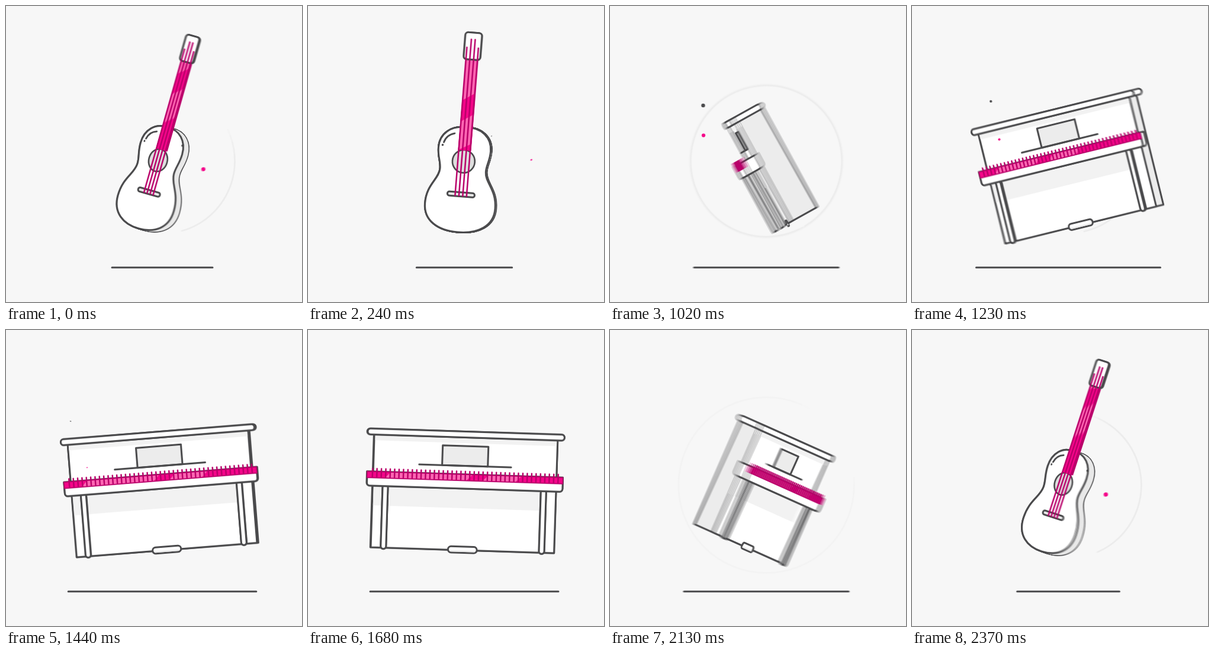
Write an HTML page with a canvas that moves like this. It is 500 by 500 pixels and loops after 2400 ms.

```html
<!DOCTYPE html>
<html lang="en">
<head>
<meta charset="utf-8">
<title>Guitar and piano</title>
<style>
  html, body { margin: 0; height: 100%; overflow: hidden; background: #f7f7f7; }
  canvas { display: block; width: 500px; height: 500px; }
</style>
</head>
<body>
<canvas id="stage" width="500" height="500"></canvas>
<script>
const LOOP = 2400, HALF = 1200, FLIP = 1010;
const INK = '#4a4a4c', PALE = '#ececec', PINK = '#f5058a', DEEP = '#b9006a', LIGHT = '#ff66b3';
const screen = document.getElementById('stage').getContext('2d');
const layer = document.createElement('canvas');
layer.width = layer.height = 500;
const ctx = layer.getContext('2d');

// Smooth curve through [x, y] points, clamped at both ends
function curve(...pts) {
  const last = pts.length - 1;
  const slope = i => {
    const [x0, y0] = pts[Math.max(i - 1, 0)], [x1, y1] = pts[Math.min(i + 1, last)];
    return (y1 - y0) / (x1 - x0);
  };
  return x => {
    if (x <= pts[0][0]) return pts[0][1];
    if (x >= pts[last][0]) return pts[last][1];
    const i = pts.findIndex(p => p[0] > x) - 1;
    const [x0, y0] = pts[i], [x1, y1] = pts[i + 1];
    const d = x1 - x0, p = (x - x0) / d, q = 1 - p;
    return y0 * q * q * (1 + 2 * p) + y1 * p * p * (3 - 2 * p)
      + d * p * q * (slope(i) * q - slope(i + 1) * p);
  };
}

// Sway and turn depend on the time to the nearest swap
const sway = curve([0, 29.6], [10, 29.2], [160, 18.1], [190, 15.9], [290, 9.7], [430, 4.6], [600, 0]);
const turnAt = curve([0, 1], [10, .97], [160, .33], [190, .28], [290, .16], [430, .045], [600, 0]);
const shine = curve([0, -200], [160, -140], [190, -122], [430, -75], [910, -52], [1200, -40]);
const ringRadius = curve([-290, 150], [-50, 148], [-20, 146.5], [10, 128], [160, 123.5], [190, 122.5], [250, 121]);
const ringStart = curve([-290, -360], [10, -212], [160, 23], [190, 73], [245, 168]);
const ringEnd = curve([-290, -358], [-20, 120], [10, 148], [160, 156], [190, 164], [245, 169]);
const ringAlpha = curve([-290, .35], [-50, .4], [-20, 1], [10, 1]);

let turn = 0, squash = 1;

function finish(fill, stroke, width) {
  if (fill) { ctx.fillStyle = fill; ctx.fill(); }
  if (stroke) { ctx.strokeStyle = stroke; ctx.lineWidth = width; ctx.stroke(); }
}

// Path on a plane at depth z; the stroke keeps its width
function paint(z, build, fill, stroke = INK, width = 3) {
  ctx.save();
  ctx.translate(-turn * z, 0);
  ctx.scale(squash, 1);
  ctx.beginPath();
  build();
  ctx.restore();
  finish(fill, stroke, width);
}

const rect = (x0, x1, y0, y1, r = 0) => () => ctx.roundRect(x0, y0, x1 - x0, y1 - y0, r);
const line = (x0, y0, x1, y1) => () => { ctx.moveTo(x0, y0); ctx.lineTo(x1, y1); };

function box(x0, x1, y0, y1, front, back, { r = 0, fill = '#fff', side = '#fff', stroke = INK } = {}) {
  const a = -turn * front, b = -turn * back;
  const left = squash * x0 + Math.min(a, b), right = squash * x1 + Math.max(a, b);
  ctx.beginPath();
  ctx.roundRect(left, y0, right - left, y1 - y0, r);
  finish(side, stroke, 3);
  paint(front, rect(x0, x1, y0, y1, r), fill, stroke);
}

function disc(x, y, r, color) {
  if (r <= 0) return;
  ctx.beginPath();
  ctx.arc(x, y, r, 0, 7);
  finish(color);
}

function guitarBody() {
  ctx.moveTo(0, -59);
  for (const s of [1, -1]) {
    ctx.moveTo(0, -59);
    ctx.bezierCurveTo(26 * s, -61, 45 * s, -45, 45 * s, -22);
    ctx.bezierCurveTo(45 * s, -5, 39 * s, 2, 39.5 * s, 14);
    ctx.bezierCurveTo(40 * s, 32, 60.5 * s, 42, 60.5 * s, 74);
    ctx.bezierCurveTo(60.5 * s, 104, 34 * s, 118.5, 0, 118.5);
  }
}

function guitar(w) {
  const depths = Array.from({ length: 13 }, (_, i) => -6 + i * 34 / 12);
  for (const z of depths) paint(z, guitarBody, null);
  for (const z of depths) paint(z, guitarBody, '#e9e9e9', null);
  paint(28, guitarBody, '#fff');
  paint(28, () => {
    ctx.moveTo(-36.5, -31);
    ctx.quadraticCurveTo(-33, -44, -19, -47.5);
  }, null, INK, 2.8);
  paint(28, () => ctx.arc(-38.2, -26.5, 1.8, 0, 7), INK, null);
  paint(28, () => ctx.arc(0, -1.4, 19.3, 0, 7), '#dedede', INK, 2.6);
  paint(28, rect(-23.5, 23.5, 51, 58, 3.5), '#ebebeb');

  box(-11, 11, -173, -20, 28, 20, { fill: PINK, side: DEEP, stroke: null });
  const b = shine(w);
  const stripe = (from, to) => paint(28, () => {
    const at = (y, tilt) => Math.max(-173, Math.min(-20, y + tilt));
    ctx.moveTo(-11, at(from, 7));
    ctx.lineTo(11, at(from, -7));
    ctx.lineTo(11, at(to, -7));
    ctx.lineTo(-11, at(to, 7));
  }, LIGHT, null);
  stripe(-250, b - 36);
  stripe(b, b + 50);

  box(-14.3, 14.3, -219.5, -174, 28, 22, { r: 5 });
  for (const x of [-10, -3.4, 3.2, 9.8])
    paint(28, line(x, Math.abs(x) > 5 ? -194 : -208, x, 57), null, DEEP, 2.5);
}

function piano(w) {
  box(-155.5, 155.5, -84, 108, 20, -32, { side: PALE });
  paint(20, rect(-154, 154, -82, -73), '#f2f2f2', null);
  paint(20, rect(-154, 130, 4, 37), '#f2f2f2', null);
  box(-167, 167, -92.5, -82.5, 24, -34, { r: 5 });
  paint(20, rect(-39, 38.5, -68, -34.5), PALE);
  paint(27, line(-78, -34.5, 78, -34.5), null);
  box(-139, -130, 2, 110, 41, 32, { r: 4.5 });
  box(129.5, 138.5, 2, 110, 41, 32, { r: 4.5 });
  box(-166, 166, -20, 4, 44, 17, { r: [0, 0, 5, 5] });

  const shift = shine(w) + 75;
  paint(44, rect(-166, 166, -20, -9.5), PINK, null);
  const stripe = (from, to) => paint(44, () => {
    ctx.moveTo(from + 5, -20);
    ctx.lineTo(to + 5, -20);
    ctx.lineTo(to - 5, -9.5);
    ctx.lineTo(from - 5, -9.5);
  }, LIGHT, null);
  stripe(-131, -7 + shift);
  stripe(20 + shift, 76 + shift);
  paint(44, rect(-166, 166, -20, -9.5), null, DEEP, 1.8);
  paint(44, () => {
    for (let i = 0; i < 43; i++) line(-157 + i * 7.5, -25, -157 + i * 7.5, -11)();
  }, null, DEEP, 2.5);

  paint(20, rect(-24.5, 24.5, 102, 112.5, 5.2), '#fff');
  paint(20, rect(-21, 21, 108.5, 111), PALE, null);
}

function ring(w) {
  if (w < -290 || w > 245) return;
  const angle = deg => (deg - 90) * Math.PI / 180;
  const from = ringStart(w), to = Math.min(ringEnd(w), from + 360);
  if (to <= from) return;
  ctx.globalAlpha = ringAlpha(w);
  ctx.beginPath();
  ctx.arc(264, 262, ringRadius(w), angle(from), angle(to));
  finish(null, PALE, 2.5);
  ctx.globalAlpha = 1;
}

function dots(isPiano, w) {
  const u = w + 10, size = 1 - u / 610;
  if (isPiano) {
    disc(159.8 - .115 * u, 168.7 - .033 * u, 3.3 * size, INK);
    disc(159 - .05 * u, 217.8 + .033 * u, 3.2 * size, PINK);
  } else {
    const x = 291 + .2235 * u - .000063 * u * u;
    disc(288 + .05 * u, 249.3 - .067 * u, 2.8 * size, INK);
    disc(x, 278 - (x - 327) * .36, 5 * size, PINK);
  }
}

function scene(t) {
  const phase = ((t - FLIP) % LOOP + LOOP) % LOOP;
  const isPiano = phase < HALF, w = phase % HALF;
  const near = Math.min(w, HALF - w), side = w < HALF / 2 ? 1 : -1;
  const amount = turnAt(near);
  turn = side * amount;
  squash = Math.max(.02, 1 - amount ** 1.3);

  ctx.fillStyle = '#f7f7f7';
  ctx.fillRect(0, 0, 500, 500);
  ctx.lineCap = ctx.lineJoin = 'round';
  ring(w > 600 ? w - HALF : w);

  const [own, other] = isPiano ? [159, 80.5] : [80.5, 159];
  const reach = own + (other - own) * .5 * amount ** 1.7;
  ctx.beginPath();
  line(264 - reach, 441.7, 264 + reach, 441.7)();
  finish(null, INK, 3);

  ctx.save();
  ctx.translate(264, 264);
  ctx.rotate(side * sway(near) * (isPiano ? -1 : 1) * Math.PI / 180);
  (isPiano ? piano : guitar)(w);
  ctx.restore();
  dots(isPiano, w);
}

// Average a few nearby moments for motion blur
function frame() {
  const t = performance.now() % LOOP;
  for (let i = 0; i < 5; i++) {
    scene(t + (i - 2) * 3);
    screen.globalAlpha = 1 / (i + 1);
    screen.drawImage(layer, 0, 0);
  }
  requestAnimationFrame(frame);
}
frame();
</script>
</body>
</html>
```
